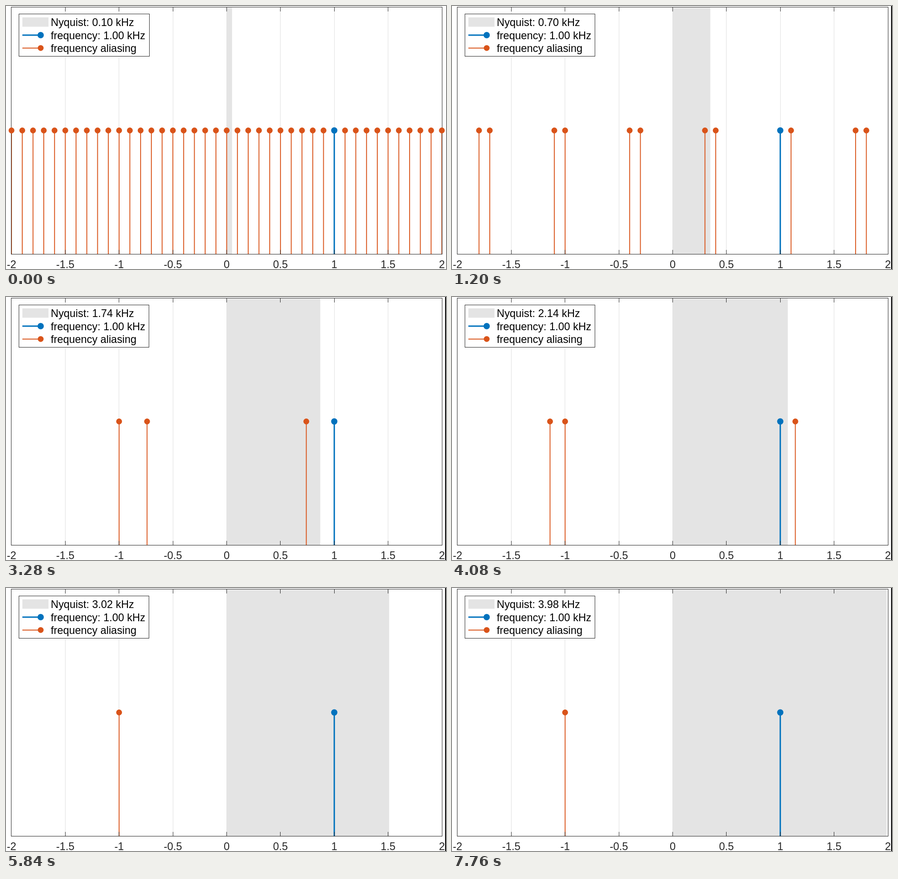
Recreate the animation shown at these times as an HTML page with a canvas. Size 968 by 578 pixels, loop 7.84 s.

```html
<!DOCTYPE html>
<html lang="en">
<head>
<meta charset="utf-8">
<title>Frequency aliasing</title>
<style>
html, body { margin: 0; width: 100%; height: 100%; overflow: hidden; background: #fff; }
canvas { display: block; }
</style>
</head>
<body>
<canvas id="plot" width="968" height="578"></canvas>
<script>
const ctx = document.getElementById('plot').getContext('2d');
const STEP = 80, COUNT = 98;
const LEFT = 11.5, RIGHT = 959.5, TOP = 2.5, BOTTOM = 545.5, MID = 273.5;
const BLUE = '#0072bd', ORANGE = '#d95319', GRAY = '#e4e4e4', INK = '#262626';

// Frequencies are whole hundredths of a kHz.
const TONE = 100, LIMIT = 200;
const toX = f => 485.5 + f * 2.367;
const snap = x => Math.floor(x) + 0.5;

function line(x1, y1, x2, y2, color, width) {
  ctx.strokeStyle = color;
  ctx.lineWidth = width;
  ctx.beginPath();
  ctx.moveTo(x1, y1);
  ctx.lineTo(x2, y2);
  ctx.stroke();
}

function dot(x, y, r, color) {
  ctx.fillStyle = color;
  ctx.beginPath();
  ctx.arc(x, y, r, 0, Math.PI * 2);
  ctx.fill();
}

function box(x, y, w, h) {
  ctx.strokeStyle = INK;
  ctx.lineWidth = 1;
  ctx.strokeRect(x, y, w, h);
}

function label(str, x, y, align, color) {
  ctx.font = '23.4px "Liberation Sans", Arial, sans-serif';
  ctx.textAlign = align;
  ctx.fillStyle = color;
  ctx.fillText(str, x, y);
}

function aliases(rate) {
  const found = new Set();
  for (const base of [TONE, -TONE]) {
    const first = Math.ceil((-LIMIT - base) / rate);
    for (let f = base + first * rate; f <= LIMIT; f += rate) found.add(f);
  }
  found.delete(TONE);
  return found;
}

function drawLegend(rate, wide) {
  const w = wide ? 287 : 286;
  ctx.fillStyle = '#fff';
  ctx.fillRect(28, 17, w, 94);
  box(28.5, 17.5, w, 93);
  ctx.fillStyle = GRAY;
  ctx.fillRect(36, 25, 57.5, 20.5);
  line(36, 64, 76, 64, BLUE, 3);
  dot(76.3, 64, 6.9, BLUE);
  line(36, 92.5, 76, 92.5, ORANGE, 1.9);
  dot(76.3, 92.3, 6.4, ORANGE);
  label(`Nyquist: ${(rate / 100).toFixed(2)} kHz`, 98.5, 44, 'left', '#000');
  label(`frequency: ${(TONE / 100).toFixed(2)} kHz`, 98.5, 72.5, 'left', '#000');
  label('frequency aliasing', 98.5, 101, 'left', '#000');
}

function draw(n) {
  const rate = 10 + 4 * n;
  const stems = aliases(rate);
  const wide = stems.has(LIMIT);

  ctx.fillStyle = '#fff';
  ctx.fillRect(0, 0, 968, 578);

  for (let f = -150; f <= 150; f += 50) {
    line(snap(toX(f)), TOP, snap(toX(f)), BOTTOM, '#dfdfdf', 1);
  }
  ctx.fillStyle = GRAY;
  ctx.fillRect(485.5, 3.5, toX(rate / 2) - 485.5, BOTTOM - 3.5);

  for (const f of stems) line(toX(f), MID, toX(f), BOTTOM, ORANGE, 1.9);
  line(toX(TONE), MID, toX(TONE), BOTTOM, BLUE, 3);

  box(LEFT, TOP, RIGHT - LEFT, BOTTOM - TOP);
  for (let f = -LIMIT; f <= LIMIT; f += 50) {
    const x = snap(toX(f));
    if (Math.abs(f) < LIMIT) {
      line(x, TOP, x, TOP + 9.5, INK, 1);
      line(x, BOTTOM - 9.5, x, BOTTOM, INK, 1);
    }
    label(String(f / 100), toX(f), 575.5, 'center', INK);
  }

  for (const f of stems) dot(toX(f), MID, 6.4, ORANGE);
  dot(toX(TONE), MID, 6.9, BLUE);
  drawLegend(rate, wide);

  // A marker on the right limit widens the picture; otherwise a black edge shows.
  if (!wide) {
    ctx.fillStyle = '#000';
    ctx.fillRect(966, 0, 2, 578);
  }
}

let start = null, shown = -1;
function tick(now) {
  if (start === null) start = now;
  const n = Math.floor((now - start) / STEP) % COUNT;
  if (n !== shown) draw(shown = n);
  requestAnimationFrame(tick);
}
draw(0);
requestAnimationFrame(tick);
</script>
</body>
</html>
```
